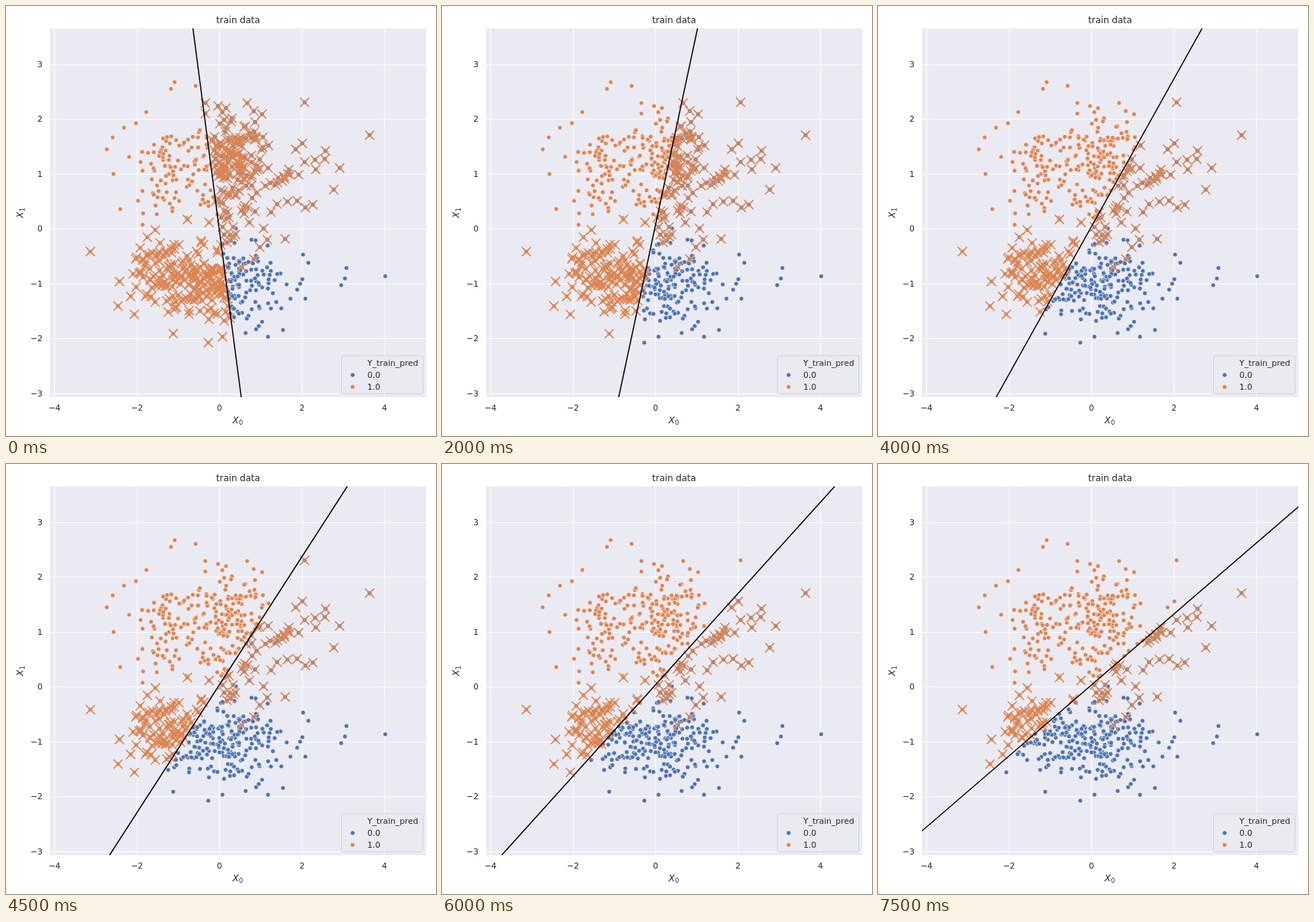
Recreate the animation shown at these times as an HTML page with a canvas. Size 576 by 576 pixels, loop 8000 ms.

```html
<!DOCTYPE html>
<html lang="en">
<head>
<meta charset="utf-8">
<title>train data</title>
<style>
html, body { margin: 0; width: 100%; height: 100%; overflow: hidden; background: #fff; }
canvas { display: block; }
</style>
</head>
<body>
<canvas id="stage" width="576" height="576"></canvas>
<script>
const c = document.getElementById('stage').getContext('2d');
const BLUE = '#4c72b0', ORANGE = '#dd8452', PANEL = '#eaeaf2', INK = '#262626';
const LEFT = 59, TOP = 30, W = 504, H = 494;
const STEP = 500, STEPS = 16;
const SANS = '"DejaVu Sans", sans-serif';
const px = v => 286 + 55.25 * v;
const py = v => 298 - 73.5 * v;

let seed = 7;
function rand() {
  seed = (seed + 0x6d2b79f5) | 0;
  let t = Math.imul(seed ^ (seed >>> 15), 1 | seed);
  t = (t + Math.imul(t ^ (t >>> 7), 61 | t)) ^ t;
  return ((t ^ (t >>> 14)) >>> 0) / 4294967296;
}
const normal = () => Math.sqrt(-2 * Math.log(1 - rand())) * Math.cos(2 * Math.PI * rand());

// Isolated points in pixels, by true class
const upper = [
  226,102, 221,111, 254,107, 188,142, 174,157, 158,163, 143,176, 135,192, 144,225,
  165,202, 153,272, 177,261, 183,293, 202,279, 400,129, 487,173, 447,217, 439,246,
  428,194, 427,205, 414,206, 415,219, 411,266, 401,270, 390,261, 397,184, 388,192,
  392,226, 323,130, 343,145, 267,130, 284,134, 374,312, 350,313, 345,298, 326,290,
  316,350, 332,339, 340,323, 377,262, 379,219, 400,209, 290,296];
const lower = [
  113,329, 152,369, 150,402, 167,389, 200,300, 243,286, 272,290, 508,362, 456,351,
  454,365, 449,374, 398,333, 405,344, 401,392, 397,366, 394,372, 381,392, 351,443,
  371,434, 321,438, 290,443, 271,451, 224,439, 335,433, 343,423, 390,380, 376,373,
  308,298];

const points = [];
function addList(list, label) {
  for (let i = 0; i < list.length; i += 2) points.push({ x: list[i], y: list[i + 1], label });
}
// Gaussian cloud kept inside the given box
function addCloud(label, n, mx, my, sx, sy, x0, x1, y0, y1) {
  while (n > 0) {
    const x = mx + sx * normal(), y = my + sy * normal();
    if (x < x0 || x > x1 || y < y0 || y > y1) continue;
    points.push({ x, y, label });
    n--;
  }
}
addList(upper, 1);
addList(lower, 0);
addCloud(1, 92, 228, 218, 29, 36, 180, 290, 160, 292);
addCloud(1, 165, 303, 212, 27, 36, 245, 368, 136, 285);
addCloud(1, 9, 371, 231, 5, 5, 360, 384, 215, 245);
addCloud(1, 7, 297, 307, 10, 7, 284, 326, 294, 325);
addCloud(0, 125, 222, 362, 32, 28, 164, 290, 307, 416);
addCloud(0, 165, 301, 374, 33, 26, 220, 374, 309, 430);
points.sort(() => 0).forEach(p => p.key = rand());
points.sort((a, b) => a.key - b.key);

function text(s, x, y, size, align) {
  c.font = size + 'px ' + SANS;
  c.textAlign = align;
  c.fillStyle = INK;
  c.fillText(s, x, y);
}

function dot(x, y, color) {
  c.beginPath();
  c.arc(x, y, 3, 0, 2 * Math.PI);
  c.fillStyle = color;
  c.fill();
  c.strokeStyle = '#fff';
  c.lineWidth = 0.6;
  c.stroke();
}

function cross(x, y) {
  const r = 6.1;
  c.moveTo(x - r, y - r);
  c.lineTo(x + r, y + r);
  c.moveTo(x - r, y + r);
  c.lineTo(x + r, y - r);
}

function axisName(sub, x, y) {
  c.font = 'italic 12px ' + SANS;
  c.textAlign = 'left';
  c.fillStyle = INK;
  c.fillText('X', x, y);
  c.font = '8.4px ' + SANS;
  c.fillText(sub, x + 8.4, y + 2);
}

function drawAxes() {
  c.fillStyle = '#fff';
  c.fillRect(0, 0, 576, 576);
  c.fillStyle = PANEL;
  c.fillRect(LEFT, TOP, W, H);
  const label = v => (v < 0 ? '\u2212' : '') + Math.abs(v);
  for (let v = -4; v <= 4; v += 2) {
    c.fillStyle = '#fff';
    c.fillRect(Math.round(px(v)) - 0.5, TOP, 1, H);
    text(label(v), px(v), 542, 11, 'center');
  }
  for (let v = -3; v <= 3; v++) {
    c.fillStyle = '#fff';
    c.fillRect(LEFT, Math.round(py(v)), W, 1);
    text(label(v), 49, py(v) + 4.3, 11, 'right');
  }
  text('train data', 311, 23, 12, 'center');
  axisName('0', 303.5, 559);
  c.save();
  c.translate(23, 284);
  c.rotate(-Math.PI / 2);
  axisName('1', 0, 0);
  c.restore();
}

function drawLegend() {
  c.beginPath();
  c.roundRect(449.5, 468.5, 109, 51, 2.2);
  c.fillStyle = 'rgba(234,234,242,.8)';
  c.fill();
  c.strokeStyle = 'rgba(204,204,204,.8)';
  c.lineWidth = 1;
  c.stroke();
  text('Y_train_pred', 484, 482, 11, 'left');
  [['0.0', BLUE], ['1.0', ORANGE]].forEach(([name, color], i) => {
    dot(464.3, 494.3 + 16 * i, color);
    text(name, 484, 498 + 16 * i, 11, 'left');
  });
}

function draw(step) {
  const topX = 250.4 + 22.97 * step, bottomX = 315.1 - 19.6 * step;
  const predict = p => p.x < topX + (bottomX - topX) * (p.y - TOP) / H ? 1 : 0;
  drawAxes();
  c.save();
  c.beginPath();
  c.rect(LEFT, TOP, W, H);
  c.clip();
  for (const p of points) dot(p.x, p.y, predict(p) ? ORANGE : BLUE);
  c.strokeStyle = ORANGE;
  c.lineWidth = 1.5;
  for (const p of points) {
    if (predict(p) === p.label) continue;
    c.beginPath();
    cross(p.x, p.y);
    c.stroke();
  }
  c.beginPath();
  c.moveTo(topX, TOP);
  c.lineTo(bottomX, TOP + H);
  c.strokeStyle = '#000';
  c.stroke();
  c.restore();
  drawLegend();
}

let shown = -1;
function frame() {
  const step = Math.floor(performance.now() / STEP) % STEPS;
  if (step !== shown) draw(shown = step);
  requestAnimationFrame(frame);
}
frame();
</script>
</body>
</html>
```
